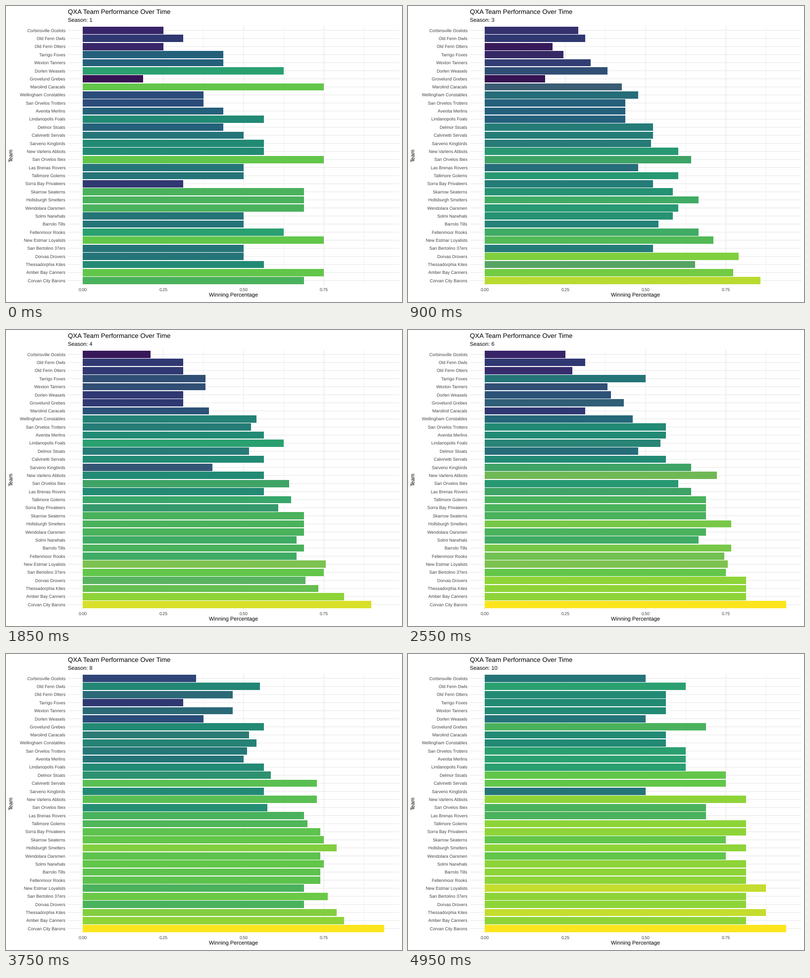
These frames come from a looping animation (800x600 px, 5000 ms). A matplotlib script:

```python
import matplotlib.pyplot as plt
import numpy as np
from matplotlib.animation import FuncAnimation
from matplotlib.patches import Rectangle

W, H, DPI = 800, 600, 100
FRAMES, INTERVAL, STEPS = 100, 50, 11
GAMES = 16

LEFT, RIGHT, TOP, BOTTOM = 125, 794.5, 39.6, 566.4
ROW = 16.36
FIRST_ROW = 49.44
X0 = LEFT + (RIGHT - LEFT) * 0.05 / 1.1
UNIT = (RIGHT - LEFT) / 1.1 / 0.9375

GRID = "#e7e7e7"
TICK = "#444444"

# Fill colours for 2 to 15 wins
PALETTE = np.array([
    (54, 6, 78), (54, 19, 82), (56, 36, 104), (48, 56, 114), (43, 76, 122),
    (37, 96, 123), (37, 116, 120), (34, 138, 116), (42, 160, 112),
    (74, 178, 92), (98, 198, 74), (142, 212, 56), (196, 221, 46),
    (253, 229, 30),
]) / 255

names = []
wins = []


def team(name, *seasons):
    names.append(name)
    wins.append(seasons)


team("Corbinsville Ocelots", 4, 4, 5, 3, 4, 4, 4, 6, 7, 8)
team("Old Fenn Owls", 5, 5, 5, 5, 5, 5, 8, 9, 9, 10)
team("Old Fenn Otters", 4, 4, 3, 5, 5, 4, 5, 8, 9, 9)
team("Tarrigo Foxes", 7, 2, 5, 5, 8, 8, 5, 5, 7, 9)
team("Wexton Tanners", 7, 4, 6, 5, 8, 5, 5, 8, 9, 9)
team("Dorlen Weasels", 10, 8, 5, 5, 5, 7, 6, 6, 7, 8)
team("Grovelund Grebes", 3, 3, 3, 5, 5, 8, 9, 9, 10, 11)
team("Marolind Caracals", 12, 10, 5, 7, 5, 5, 5, 9, 9, 9)
team("Wellingham Constables", 6, 7, 8, 9, 8, 7, 7, 9, 9, 9)
team("San Orvelos Trotters", 6, 7, 7, 8, 9, 9, 9, 8, 9, 10)
team("Avenita Merlins", 7, 7, 7, 9, 9, 9, 8, 8, 9, 10)
team("Lindanopolis Foals", 9, 7, 7, 10, 10, 8, 9, 9, 10, 10)
team("Delmor Stoats", 7, 9, 8, 9, 7, 8, 11, 9, 10, 12)
team("Calvinetti Servals", 8, 9, 8, 9, 9, 9, 10, 12, 12, 12)
team("Sarveno Kingbirds", 9, 7, 9, 5, 9, 11, 9, 9, 8, 8)
team("New Varlens Abbots", 9, 9, 10, 9, 9, 13, 10, 12, 13, 13)
team("San Orvelos Ibex", 12, 9, 11, 11, 9, 10, 10, 9, 10, 11)
team("Las Brenas Rovers", 8, 7, 8, 9, 9, 11, 11, 11, 11, 11)
team("Tallimore Golems", 8, 9, 10, 10, 11, 11, 12, 11, 12, 13)
team("Sorra Bay Privateers", 5, 9, 8, 9, 11, 11, 11, 12, 12, 13)
team("Skarrow Seaterns", 11, 10, 9, 11, 11, 11, 12, 12, 12, 12)
team("Hollsburgh Smelters", 11, 10, 11, 11, 11, 13, 11, 13, 13, 13)
team("Wendolara Oarsmen", 11, 9, 10, 11, 11, 11, 11, 12, 12, 12)
team("Solmi Narwhals", 8, 10, 9, 11, 10, 11, 12, 12, 13, 13)
team("Barrolo Tills", 8, 8, 9, 11, 11, 13, 11, 12, 12, 13)
team("Feltenmoor Rooks", 10, 10, 11, 11, 10, 13, 11, 12, 13, 13)
team("New Estmar Loyalists", 12, 12, 11, 11, 14, 11, 11, 11, 13, 14)
team("San Bertolino 37ers", 8, 9, 8, 12, 12, 12, 13, 12, 13, 13)
team("Dorvas Drovers", 8, 12, 13, 10, 13, 13, 11, 11, 12, 13)
team("Thessadorphia Kites", 9, 13, 9, 11, 13, 13, 11, 13, 13, 14)
team("Amber Bay Canners", 12, 13, 12, 13, 13, 13, 13, 13, 13, 13)
team("Corvan City Barons", 11, 15, 13, 14, 15, 15, 15, 15, 15, 15)

WINS = np.array(wins).T

RGB_TO_XYZ = np.array([
    (0.4124, 0.3576, 0.1805), (0.2126, 0.7152, 0.0722), (0.0193, 0.1192, 0.9505),
])
WHITE = RGB_TO_XYZ.sum(axis=1)
XYZ_TO_LAB = np.array([(0, 116, 0), (500, -500, 0), (0, 200, -200)])


def to_lab(rgb):
    linear = np.where(rgb > 0.04045, ((rgb + 0.055) / 1.055) ** 2.4, rgb / 12.92)
    xyz = linear @ RGB_TO_XYZ.T / WHITE
    f = np.where(xyz > 0.008856, np.cbrt(xyz), 7.787 * xyz + 16 / 116)
    return f @ XYZ_TO_LAB.T


def to_rgb(lab):
    f = lab @ np.linalg.inv(XYZ_TO_LAB).T
    xyz = np.where(f > 0.2069, f ** 3, (f - 16 / 116) / 7.787) * WHITE
    linear = np.clip(xyz @ np.linalg.inv(RGB_TO_XYZ).T, 0, 1)
    rgb = np.where(linear > 0.0031308, 1.055 * linear ** (1 / 2.4) - 0.055, 12.92 * linear)
    return np.clip(rgb, 0, 1)


LAB = to_lab(PALETTE)

plt.rcParams["font.family"] = "Liberation Sans"
plt.rcParams["text.hinting"] = "none"

fig = plt.figure(figsize=(W / DPI, H / DPI), dpi=DPI, facecolor="white")
ax = fig.add_axes([0, 0, 1, 1])
ax.set_xlim(0, W)
ax.set_ylim(H, 0)
ax.axis("off")


def px(size):
    return size * 72 / DPI


def write(x, y, text, size, ha="left", color="black", **kw):
    return ax.text(x, y, text, fontsize=px(size), ha=ha, va="baseline", color=color, **kw)


def grid_line(xs, ys, width):
    ax.plot(xs, ys, color=GRID, lw=px(width), solid_capstyle="butt", snap=False, zorder=1)


for n in range(8):
    x = X0 + n * 0.125 * UNIT
    major = n % 2 == 0
    grid_line([x, x], [TOP, BOTTOM], 1.07 if major else 0.53)
    if major:
        write(x, 578, f"{n * 0.125:.2f}", 8.8, "center", TICK)

bars = []
for row, name in enumerate(names):
    y = FIRST_ROW + row * ROW
    grid_line([LEFT, RIGHT], [y, y], 1.07)
    write(120, y + 3.2, name, 8.8, "right", TICK)
    bar = Rectangle((X0, y - 0.45 * ROW), 0, 0.9 * ROW, lw=0, zorder=2)
    bars.append(ax.add_patch(bar))

write(125, 16, "QXA Team Performance Over Time", 13.2)
season_label = write(125, 32, "", 11)
write((LEFT + RIGHT) / 2, 590, "Winning Percentage", 11, "center")
write(13.5, (TOP + BOTTOM) / 2, "Team", 11, "center", rotation=90, rotation_mode="anchor")


def draw(frame):
    season, step = divmod(frame, STEPS)
    t = step / STEPS
    start = WINS[season]
    end = WINS[min(season + 1, len(WINS) - 1)]
    widths = (start + (end - start) * t) / GAMES * UNIT
    colors = to_rgb(LAB[start - 2] * (1 - t) + LAB[end - 2] * t)
    for bar, width, color in zip(bars, widths, colors):
        bar.set_width(width)
        bar.set_facecolor(color)
    season_label.set_text(f"Season: {int(season + t + 1.5)}")
    return [*bars, season_label]


anim = FuncAnimation(fig, draw, frames=FRAMES, interval=INTERVAL, repeat=True, repeat_delay=0)
plt.show()
```
